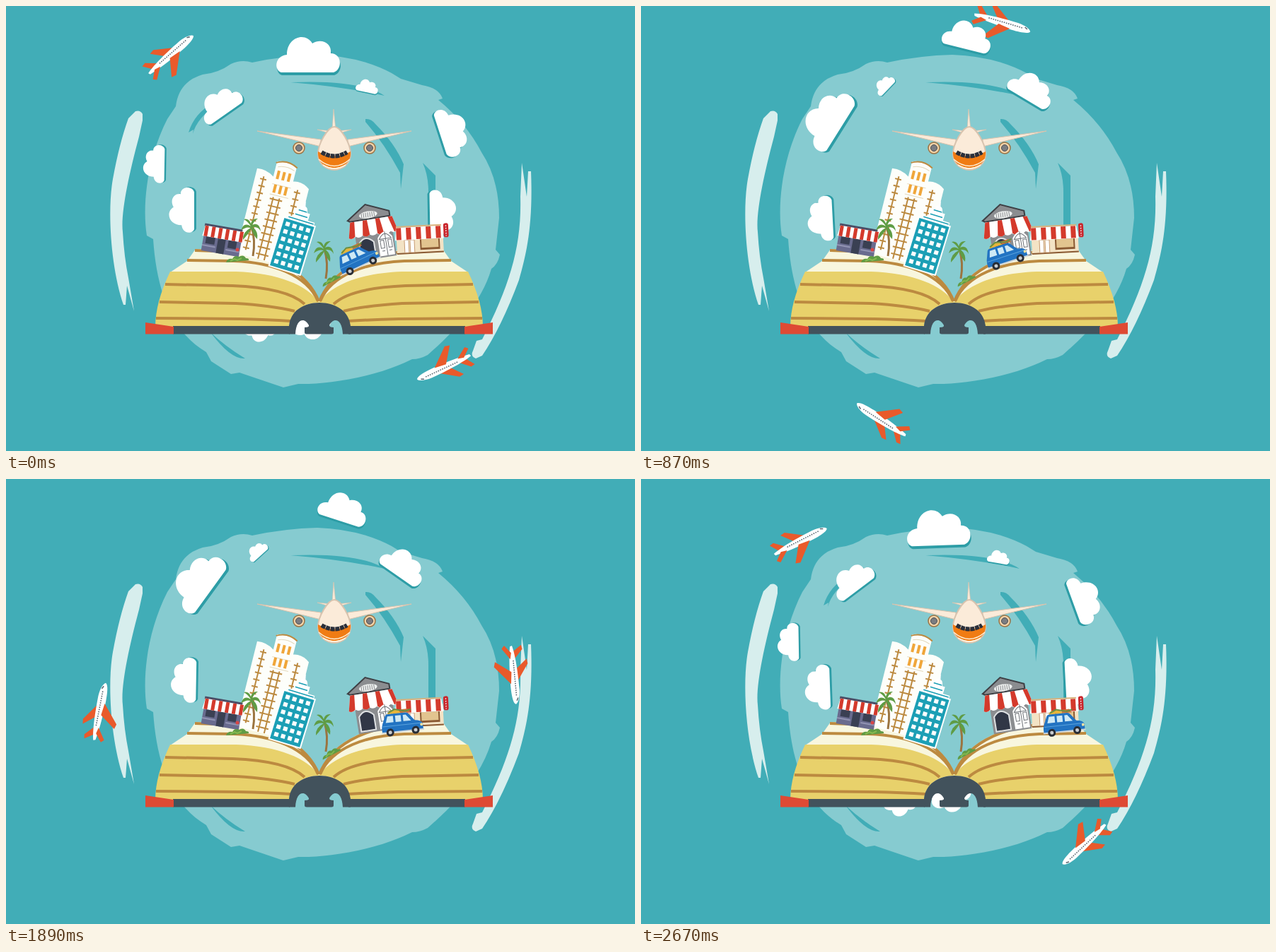
An HTML page for the animation above (2.7 s loop, 889 by 630 pixels).

```html
<!DOCTYPE html>
<html lang="en">
<head>
<meta charset="utf-8">
<title>Travel book</title>
<style>
  html, body { margin: 0; height: 100%; overflow: hidden; background: #41adb7; }
  svg { display: block; width: 889px; height: 630px; }
  .line { fill: none; stroke: #bc8a40; stroke-width: 4; }
  .ticks { fill: none; stroke: #bc8a40; stroke-width: 9; stroke-dasharray: 2 8; }
  .spine { fill: none; stroke: #bc8a40; stroke-width: 2; }
  .stripes { fill: none; stroke: #d43a2c; stroke-dasharray: 5 5; }
</style>
</head>
<body>
<svg viewBox="0 0 889 630">
  <defs>
    <path id="puff" d="M-38 0C-48-3-48-23-30-25C-30-50-4-58 6-41C19-49 34-41 32-27C48-27 49-4 36 0Z"/>
    <g id="cloud">
      <use href="#puff" x="1" y="4" fill="#2d9da6"/>
      <use href="#puff" fill="#fff"/>
    </g>
    <g id="plane">
      <path d="M-7-3L-21-20L-14-21L12-3ZM-33-2L-41-14L-35-15L-22-3Z" fill="#e95a2b"/>
      <path d="M-41-1C-30-4-10-6 22-6C34-5.500 41-2 42 1C40 5 28 6 16 6C-8 6-28 4-40 2Z" fill="#fff"/>
      <path d="M-4 3L-20 25L-13 27L13 5ZM-31 1L-42 10L-38 14L-22 3Z" fill="#e95a2b"/>
      <path d="M-20-1H30" stroke="#5a6670" stroke-width="1.6" stroke-dasharray="1.6 1.6"/>
      <path d="M33-3l4 2" stroke="#5a6670" stroke-width="1.5"/>
    </g>
    <g id="page">
      <path d="M268 344L330 346C380 352 430 376 443 420L400 440L232 377L256 361Z" fill="#f8f6de"/>
      <path d="M232 376H325C385 378 425 395 443 420C420 420 402 432 400 454H211Q211 420 232 376Z" fill="#e8d16b"/>
      <path class="line" d="M267 346L325 348C380 354 425 376 442 418M256 360L322 361C375 363 425 380 441 418M225 394L320 396C370 398 405 406 422 422M217 419L325 421Q375 424 408 432M212 442L330 443Q370 444 402 446"/>
      <path d="M236 453H401V464.5H236Z" fill="#42525c"/>
      <path d="M197 448L237 454V464.5H197Z" fill="#de4a34"/>
    </g>
    <g id="palm">
      <path d="M1 0Q7 20 3 42" fill="none" stroke="#9b7440" stroke-width="3"/>
      <path d="M0 0Q-10-7-14 6Q-7 0 0 2Q-12 8-11 19Q-3 10 1 3Q3 12 9 18Q11 8 3 1Q11 0 14 7Q12-7 2-2Q5-8 10-11Q2-12 0-4Q-3-12-10-10Q-4-7 0 0Z" fill="#5f9c45"/>
    </g>
    <g id="bush">
      <path d="M-16 6Q-14 0-7 1Q-4-5 2-2Q9-6 12 0Q17 0 16 3Z" fill="#5f9c45"/>
      <path d="M-10 4l6-3 4 2 6-3" stroke="#87b84f" stroke-width="2" fill="none"/>
    </g>
    <g id="wing">
      <path d="M355 177L445 189V199L405 189Z" fill="#fbebd9" stroke="#d8c3ae"/>
      <path d="M440 175L460 177V181Z" fill="#fbebd9" stroke="#d8c3ae" stroke-width=".7"/>
      <circle cx="414" cy="201" r="8" fill="#f2d3a8" stroke="#9c7344" stroke-width="1.5"/>
      <circle cx="414" cy="201" r="4.5" fill="#7b7c80" stroke="#4c4f55"/>
    </g>
  </defs>

  <path fill="#86cbd0" d="M348 80Q395 70 440 69Q500 71 545 95L558 103L588 112Q612 116 617 131L611 133Q650 165 672 207Q697 245 697 300L692 345L698 352Q695 366 686 372C672 420 635 460 596 494Q585 500 574 500C520 527 450 536 413 535L392 540L330 519L318 521L290 503L283 490C235 462 213 405 208 330L199 325C192 280 200 215 228 160L240 142Q244 107 278 97Q300 95 318 82Q333 75 348 80Z"/>
  <path fill="#41adb7" d="M402 108Q500 104 535 127Q475 114 402 108ZM508 160Q516 159 522 167Q550 195 562 224L558 259L557 236Q535 195 508 164ZM589 222L607 240V313H597V263Q597 240 589 222ZM299 139Q270 158 264 181L265 175L258 179Q266 152 293 137ZM289 462Q310 482 338 499Q318 501 289 462Z"/>
  <path fill="#d7eeed" d="M173 159L183 149Q190 147 193 153V162L188 185C172 245 162 295 165 320Q167 355 173 385L181 432L171 396L169 423H166C148 370 143 290 151 245Q160 195 173 159ZM729 222L736 270L738 234H742C745 310 736 350 725 388Q700 455 673 495L664 499Q656 496 660 488L665 474L673 472C712 395 729 340 727 270Z"/>

  <g id="planes"></g>
  <g id="clouds"></g>

  <use href="#page"/>
  <use href="#page" transform="matrix(-1 0 0 1 885 0)"/>
  <path fill="#42525c" d="M400 464.500V453C402 432 420 420 443 420C466 420 485 432 487 453V464.500H476C475 441 462 441 457 452Q457 455 463 455V462Q463 464.500 460 464.500H425Q422 464.500 422 462V455Q429 455 428 452C423 441 410 441 409 464.500Z"/>

  <!-- hotel -->
  <g transform="translate(325 350) rotate(14)">
    <path fill="#fdfefa" d="M0 0V-124Q14-126 25-118V-140Q39-146 54-138V-118Q66-122 78-113V3H60L45 1Z"/>
    <path d="M24-138Q39-147 55-138" fill="none" stroke="#bc8a40" stroke-width="2"/>
    <path d="M28-133Q39-138 52-133M26-108H53M26-93H53" fill="none" stroke="#e4d9bd"/>
    <path class="spine" d="M12-115V-8M32-90V0M41-90V0M63-108V-60"/>
    <path class="ticks" d="M12-112V-6M32-88V0M41-88V0M63-105V-60"/>
    <path d="M29-122H49M29-102H49" stroke="#f0a63a" stroke-width="12" stroke-dasharray="4 4"/>
  </g>

  <!-- teal block -->
  <g transform="translate(373 367) rotate(17)">
    <path fill="#fff" d="M-2-72H4V-76H11V-86H15Q16-93 20-94L22-102L24-94Q28-93 29-86H33V-76H43V-72H46V2H-2Z"/>
    <path d="M13-80H31M16-87H28M5-73.500H42" stroke="#1c9fb5" stroke-width="1.500"/>
    <path fill="#1c9fb5" d="M0-70H44V0H0Z"/>
    <path id="panes" fill="none" stroke="#fff" stroke-width="6" stroke-dasharray="6 4"/>
  </g>

  <!-- small shop -->
  <g transform="translate(276 344) rotate(10)">
    <path fill="#696b8e" d="M0-26H54V2H0Z"/>
    <path fill="#4a4d66" d="M-1-37H53V-33H-1Z"/>
    <path fill="#3a4053" d="M4-20H17V-9H4ZM21-19H32V2H21ZM36-19H48V-8H36Z"/>
    <path d="M0-34H53L56-19H-2Z" fill="#fff"/>
    <path class="stripes" stroke-width="15" d="M0-26.500H55"/>
    <path fill="#9294b3" d="M0-7H19V-5H0ZM34-6H54V-4H34Z"/>
  </g>
  <use href="#palm" x="346" y="312"/>
  <use href="#bush" x="327" y="357"/>
  <circle cx="327" cy="345" r="2.500" fill="#d64545"/>

  <!-- grey house -->
  <g transform="translate(495 362) rotate(-9)">
    <path fill="#8b8d90" d="M4-56H58V0H4Z"/>
    <path fill="#8b8d90" stroke="#3d3f44" stroke-width="2" d="M-3-59L25-78L57-64V-57H0Z"/>
    <ellipse cx="27" cy="-63" rx="13" ry="5" fill="#eef0ef"/>
    <path d="M17-63H37" stroke="#8b8d90" stroke-width="7" stroke-dasharray="1 2"/>
    <path fill="#fff" d="M0-56H60L65-36Q60-31 55-35Q50-31 45-35Q40-31 35-35Q30-31 25-35Q20-31 15-35Q10-31 5-35Q0-31-5-34Z"/>
    <path fill="#d43a2c" d="M0-56H6L4-35Q0-31-5-34ZM12-56H18L15-35Q20-31 25-35L24-56ZM30-56H36V-35Q40-31 45-35L42-56ZM48-56H54L60-34Q63-33 65-36L60-56Z"/>
    <path fill="#313746" stroke="#dfe1e3" stroke-width="2" d="M8-3V-24Q18-37 29-24V-3Z"/>
    <path fill="#fff" d="M35-2V-28Q46-44 56-28V-2Z"/>
    <path fill="none" stroke="#6d7176" d="M37-26Q46-40 54-26ZM46-36V-2M38-24H43V-13H38ZM49-24H54V-13H49ZM39-9H43M49-9H53"/>
  </g>

  <!-- bakery -->
  <g transform="translate(553 352) rotate(-3)">
    <path fill="#f3e3c5" d="M0-30H66V0H0Z"/>
    <path fill="#8a5a33" d="M33-21H61V-5H33ZM0-2H66V0H0Z"/>
    <path fill="#e2c48f" d="M35-20H59V-8H35Z"/>
    <path fill="#fff" stroke="#c69a72" d="M11-20H17V-2H11ZM19-20H25V-2H19Z"/>
    <path fill="#fff" d="M0-38H64L67-20H-2Z"/>
    <path class="stripes" stroke-width="17" style="stroke-dasharray:7 7" d="M0-29H66"/>
    <path d="M0-39H64" stroke="#d9b27d" stroke-width="2"/>
    <rect x="67" y="-41" width="7" height="20" rx="3" fill="#c9262c"/>
    <path d="M70.500-38V-23" stroke="#fff" stroke-width="1.500" stroke-dasharray="1.500 2"/>
  </g>

  <use href="#palm" x="449" y="344"/>
  <use href="#bush" transform="translate(459 387) rotate(-22) scale(.9)"/>

  <g id="car">
    <path fill="#e7b53b" d="M-20-25L-16-30H-4L0-25Z"/>
    <path fill="#c8743a" d="M-1-25V-30H10L13-25Z"/>
    <path d="M-18-27L-9-31L6-27L14-29" fill="none" stroke="#6b8f43" stroke-width="2"/>
    <path fill="#2273c2" d="M-28-11L-23-23Q-22-25-19-25H6Q9-25 11-22L18-13Q28-12 29-7V1H-29Q-30-6-28-11Z"/>
    <path fill="#cfe9f5" d="M-23-13L-20-22H-12V-13ZM-9-13V-22H-1V-13ZM2-13V-22H6L13-13Z"/>
    <path d="M-28-8H28" stroke="#5aa3dd"/>
    <path d="M-30 1H30" stroke="#cfd6da" stroke-width="2"/>
    <g fill="#c9cdd0" stroke="#282d35" stroke-width="3">
      <circle cx="-18" cy="1" r="4"/><circle cx="18" cy="1" r="4"/>
    </g>
    <circle cx="27" cy="-6" r="2" fill="#f4e3a0"/>
  </g>

  <!-- airliner seen from the front -->
  <path d="M463 146L461 176H466Z" fill="#fbebd9" stroke="#d8c3ae" stroke-width=".7"/>
  <use href="#wing"/>
  <use href="#wing" transform="matrix(-1 0 0 1 928 0)"/>
  <path fill="#fbebd9" stroke="#d8c3ae" stroke-width="2" d="M464 171C455 171 441 195 441 209C441 224 453 232 464 232C475 232 487 224 487 209C487 195 473 171 464 171Z"/>
  <path fill="#f07c14" d="M441 206Q464 219 487 206C488 223 475 229 464 229C453 229 440 223 441 206Z"/>
  <path d="M442 217Q464 236 486 217M448 225Q464 235 480 225" fill="none" stroke="#fff0d9" stroke-width="1.500"/>
  <path d="M446 207Q464 218 482 207" fill="none" stroke="#2a2f3a" stroke-width="6" stroke-dasharray="6 .8"/>
</svg>

<script>
const LOOP = 2700, STEP = 30, TURN = 180 / LOOP;
const $ = id => document.getElementById(id);

// base centre x, y, tilt, width
const clouds = [
  [427, 94, 0, 90], [509, 122, 12, 32], [614, 183, 72, 70],
  [599, 294, 89, 67], [429, 436, 186, 64], [360, 446, 203, 52],
  [224, 224, -89, 54], [266, 289, -90, 64], [312, 152, -35, 64]
];
// polar angle, radius, heading offset from the tangent
const planes = [[-131.3, 293, 0], [49, 295, 16]];
// keyframes: time, then values
const drive = [
  [0, 502, 367, -25], [630, 512.5, 363, -21], [1110, 525, 360, -15],
  [1530, 546, 357, -10], [1890, 561, 356, -6], [LOOP, 600, 356.5, -6]
];
const cloudPivot = [[0, 261], [630, 270], [1110, 261], [LOOP, 261]];
const planePivot = [[0, 289], [630, 304], [LOOP, 304]];

$('clouds').innerHTML = clouds.map(([x, y, tilt, w]) =>
  `<use href="#cloud" transform="translate(${x} ${y}) rotate(${tilt}) scale(${w / 90})"/>`).join('');
$('planes').innerHTML = planes.map(([angle, r, lean]) =>
  `<use href="#plane" transform="rotate(${angle}) translate(${r} 0) rotate(${90 + lean})"/>`).join('');
$('panes').setAttribute('d',
  Array.from({ length: 6 }, (_, i) => `M4 ${-63 + i * 11}H40`).join(''));

const place = (id, value) => $(id).setAttribute('transform', value);

function tween(keys, t) {
  const i = keys.findIndex(k => k[0] > t);
  const a = keys[i - 1], b = keys[i], f = (t - a[0]) / (b[0] - a[0]);
  return a.map((v, n) => v + (b[n] - v) * f).slice(1);
}

let start;
function frame(now) {
  start ??= now;
  const t = Math.floor((now - start) % LOOP / STEP) * STEP;
  const [x, y, tilt] = tween(drive, t);
  const swing = -TURN * Math.min(t, LOOP - t);
  place('clouds', `translate(421 ${tween(cloudPivot, t)}) rotate(${swing}) translate(-421 -261)`);
  place('planes', `translate(426 ${tween(planePivot, t)}) rotate(${TURN * t})`);
  place('car', `translate(${x} ${y}) rotate(${tilt})`);
  requestAnimationFrame(frame);
}
requestAnimationFrame(frame);
</script>
</body>
</html>
```
